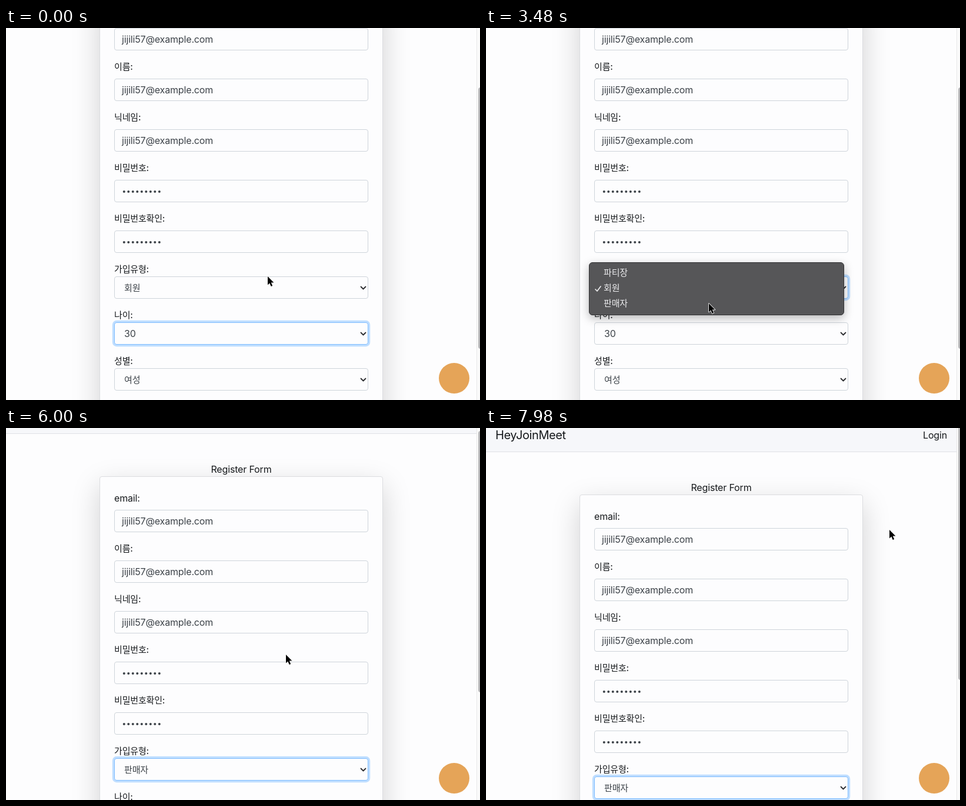
Animation, 806 px wide and 632 px high, one loop 8 s. Source, as an HTML page:

```html
<!DOCTYPE html>
<html lang="ko">
<head>
<meta charset="utf-8">
<title>Register Form</title>
<style>
  html, body { margin: 0; width: 100%; height: 100%; overflow: hidden; }
  body { background: #fdfdfe; color: #16191c; font: 16px/20px Inter, "Noto Sans CJK KR", "Noto Sans CJK", sans-serif; letter-spacing: -.01em; }
  #stage { position: relative; width: 806px; height: 632px; overflow: hidden; }
  #stage div, #stage svg { position: absolute; box-sizing: border-box; white-space: nowrap; }
  #page { left: 0; top: 0; width: 800px; height: 0; }
  #nav { top: -330px; width: 800px; height: 201px; background: #f6f7fa; border-bottom: 1px solid #e0e1e6; }
  #brand { left: 16px; top: -170px; font-size: 20px; line-height: 24px; letter-spacing: -.02em; }
  #login { right: 16px; top: -168px; }
  #title { width: 800px; top: -79px; text-align: center; }
  #card { left: 159px; top: -57px; width: 482px; height: 1000px; background: #fdfdfe; border: 1px solid #dcdde0; border-radius: 4px; box-shadow: 0 16px 48px rgba(0, 0, 0, .175); }
  .ko { font-size: 15px; font-weight: 500; }
  .label { left: 184px; }
  .field { left: 184px; width: 432px; height: 38px; padding-left: 12px; line-height: 37px; border: 1px solid #ced4da; border-radius: 4px; background: #fdfdfe; color: #3c4248; }
  .select { padding-left: 16px; }
  .select svg { left: 417px; top: 15px; }
  .focus { border-color: #80bdff; box-shadow: 0 0 0 3.2px #bfdeff; }
  #stage .dots { left: 12px; top: 15px; width: 67.5px; height: 8px; background: radial-gradient(circle at 3.75px 4px, #3c4248 1.5px, transparent 2.3px) 0 0 / 7.5px 8px; }
  #track { left: 800px; top: 0; width: 6px; height: 632px; background: #fafafa; border-left: 1px solid #e8e8e8; }
  #thumb { left: 803px; width: 8px; height: 444px; border-radius: 4px; background: #b9b9bb; }
  #badge { left: 736px; top: 569px; width: 52px; height: 52px; border-radius: 50%; background: #e5a458; }
  #menu { left: 175px; top: 398px; width: 434px; height: 90px; border: 1px solid #303032; border-radius: 6px; background: #565658; box-shadow: 0 5px 16px rgba(0, 0, 0, .28); }
  #highlight { left: 5px; top: 4px; width: 422px; height: 27px; border-radius: 5px; background: #457be6; }
  .option { left: 24px; color: #ececee; }
  .option.on { color: #fff; }
</style>
</head>
<body>
<div id="stage">
  <div id="page">
    <div id="card"></div>
    <div id="nav"></div>
    <div id="brand">HeyJoinMeet</div>
    <div id="login">Login</div>
    <div id="title">Register Form</div>
  </div>
  <div id="track"></div>
  <div id="thumb"></div>
  <div id="badge"></div>
  <div id="menu">
    <div id="highlight"></div>
    <svg style="left:8px;top:38px" width="14" height="12" fill="none" stroke="#ececee" stroke-width="1.7" stroke-linecap="round" stroke-linejoin="round"><path d="M2 7 5 10 11 2"/></svg>
  </div>
  <svg id="cursor" style="left:0;top:0;overflow:visible" width="12" height="19"><path d="M0 0V14.5L3.3 11.5 5.7 17 8.2 16 5.8 10.6H10.4Z" fill="#000" stroke="#fff" stroke-width="1.6" stroke-linejoin="round" paint-order="stroke"/></svg>
</div>
<script>
const DURATION = 8000;
const MENU_OPEN = 900, PICKED = 3460, MENU_CLOSE = 3580, FADE = 180;
const TOP_OFFSET = 170;
const $ = id => document.getElementById(id);

function add(parent, className, text, top) {
  const el = document.createElement('div');
  el.className = className;
  el.textContent = text;
  el.style.top = top + 'px';
  return parent.appendChild(el);
}

const EMAIL = 'jijili57@example.com';
const inputs = [['email:', EMAIL], ['이름:', EMAIL], ['닉네임:', EMAIL], ['비밀번호:', ''], ['비밀번호확인:', '']];
inputs.forEach(([label, value], i) => {
  const top = i * 86;
  add($('page'), i ? 'label ko' : 'label', label, top - 30);
  const field = add($('page'), 'field', value, top);
  if (!value) add(field, 'dots', '', 15);
});

const chevron = '<svg width="11" height="8" fill="none" stroke="#2c2d30" stroke-width="1.8" stroke-linecap="round" stroke-linejoin="round"><path d="M1.5 1.5 5.5 5.5 9.5 1.5"/></svg>';
const [typeSelect, ageSelect] = [['가입유형:', '회원'], ['나이:', '30'], ['성별:', '여성']].map(([label, value], i) => {
  const top = 422 + i * 78;
  add($('page'), 'label ko', label, top - 22);
  const field = add($('page'), 'field select' + (value === '30' ? '' : ' ko'), '', top);
  field.innerHTML = `<span>${value}</span>${chevron}`;
  return field;
});
const typeValue = typeSelect.querySelector('span');
const options = ['파티장', '회원', '판매자'].map((text, i) => add($('menu'), 'option ko', text, 7 + i * 26));

// Rows of [time, ...values]; eased between neighbouring rows.
const cursorPath = [
  [150, 445, 422], [800, 439, 430], [1660, 439, 430], [2400, 412, 448], [3100, 379, 468],
  [4250, 379, 468], [4900, 476, 385], [7500, 476, 385], [7920, 686, 173]
];
const scrollPath = [
  [5200, 0], [5300, 13], [5600, 69], [6000, 139], [6350, 170], [6750, 178], [7260, 174], [7540, 170]
];
const smooth = u => u * u * (3 - 2 * u);
const linear = u => u;

function sample(path, t, ease) {
  const next = path.findIndex(row => row[0] > t);
  if (next === 0) return path[0].slice(1);
  if (next < 0) return path[path.length - 1].slice(1);
  const a = path[next - 1], b = path[next];
  const u = ease((t - a[0]) / (b[0] - a[0]));
  return a.slice(1).map((v, i) => v + (b[i + 1] - v) * u);
}

function draw(t) {
  const [x, y] = sample(cursorPath, t, smooth);
  const scroll = Math.round(sample(scrollPath, t, linear)[0]);
  $('cursor').style.transform = `translate(${Math.round(x)}px, ${Math.round(y)}px)`;
  $('page').style.transform = `translateY(${scroll}px)`;
  $('thumb').style.top = 101 - Math.min(scroll, TOP_OFFSET) * .69 + 'px';

  const opened = t >= MENU_OPEN;
  ageSelect.classList.toggle('focus', !opened);
  typeSelect.classList.toggle('focus', opened);
  typeValue.textContent = t < MENU_CLOSE ? '회원' : '판매자';

  // The chosen row blinks once before the menu fades.
  const blink = t >= PICKED && t < PICKED + 60;
  const row = y <= 430 ? 0 : y <= 456 ? 1 : 2;
  $('menu').style.opacity = opened ? Math.max(0, Math.min(1, 1 - (t - MENU_CLOSE) / FADE)) : 0;
  $('highlight').style.opacity = blink ? 0 : 1;
  $('highlight').style.top = 4 + row * 26 + 'px';
  options.forEach((option, i) => option.classList.toggle('on', !blink && i === row));
}

const start = performance.now();
function frame() {
  draw((performance.now() - start) % DURATION);
  requestAnimationFrame(frame);
}
frame();
</script>
</body>
</html>
```
